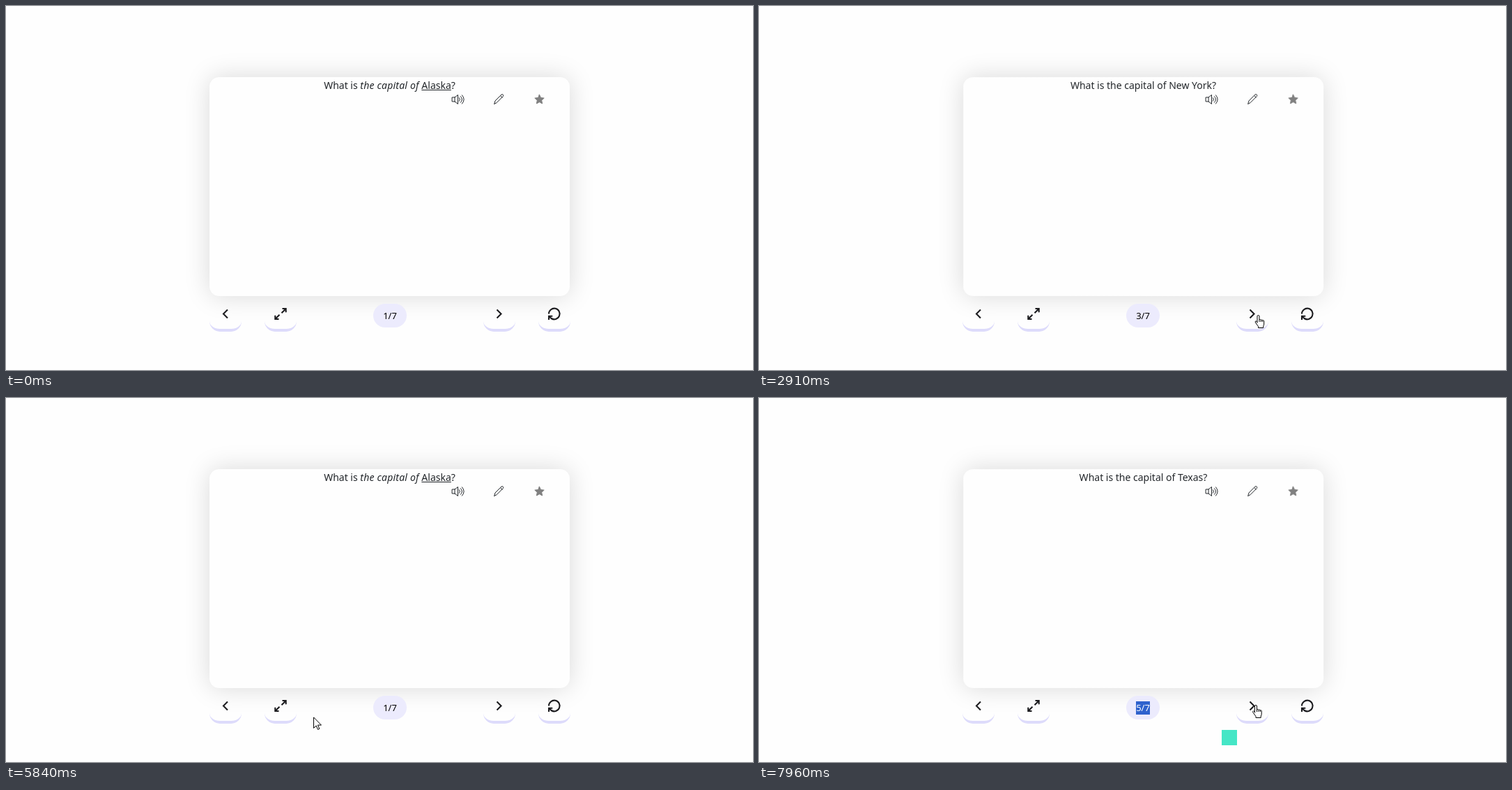
These frames come from a looping animation (1072x522 px, 8 s). An HTML page:

```html
<!DOCTYPE html>
<html lang="en">
<head>
<meta charset="utf-8">
<title>Flashcards</title>
<style>
html, body { margin: 0; width: 100%; height: 100%; overflow: hidden; background: #fefefe; }
body { position: relative; font-family: "Noto Sans", "Open Sans", sans-serif; color: #212529; }
#stage, #ui { position: absolute; left: 0; top: 0; width: 1072px; height: 522px; }
#card { position: absolute; left: 292px; top: 102px; width: 517px; height: 314px; border-radius: 14px;
  background: #fefefe; box-shadow: 0 0 36px rgba(0,0,0,.15); }
#question { font-size: 14px; line-height: 24px; text-align: center; white-space: nowrap; }
#question i { letter-spacing: .2px; }
#card svg { position: absolute; left: 0; top: 0; overflow: visible; }
.button { position: absolute; top: 421px; width: 46px; height: 46px; box-sizing: border-box;
  border-bottom: 4px solid #dddbfb; border-radius: 15px; }
#pill { position: absolute; left: 527px; top: 427px; width: 48px; height: 34px; border-radius: 17px;
  background: #ecebfd; font-size: 13px; font-weight: 500; line-height: 34px; text-align: center; color: #000; }
#count { display: inline-block; height: 19px; line-height: 19px; }
#count.selected { background: #2f62cd; color: #fff; }
#badge { position: absolute; width: 22px; height: 22px; background: #45e6c6; }
</style>
</head>
<body>
<div id="stage">
  <div id="card">
    <div id="question"></div>
    <svg width="517" height="60" fill="none" stroke="#212529" stroke-linecap="round" stroke-linejoin="round">
      <path d="M348.500 29h3.500l4.500-3.500v13l-4.500-3.500h-3.500zM352 29v6M358.500 29.700q2 2.300 0 4.600M360.500 27.700q4 4.300 0 8.600M362.500 25.800q5.500 6.200 0 12.400"/>
      <path d="M408.700 38.300l1.300-4.300 9-9q1.200-.8 2.200.2t.2 2.200l-9 9zM417.500 26.500l2.500 2.500"/>
      <path fill="#808080" stroke="#808080" d="M473.500 25.200l2 4.300 4.700.6-3.500 3.200.9 4.700-4.100-2.300-4.100 2.300.9-4.700-3.500-3.200 4.700-.6z"/>
    </svg>
  </div>
</div>
<div id="buttons"></div>
<div id="pill"><span id="count"></span></div>
<div id="badge"></div>
<svg id="ui" fill="none" stroke="#1c1c1f" stroke-width="2.100">
  <path d="M318 435.500l-6 6 6 6M704.500 435.500l6 6-6 6"/>
  <path d="M396.500 434h5.200v5.200M401.500 434.200l-6 6M391.500 449h-5.200v-5.200M386.500 448.800l6-6"/>
  <path d="M779 441.500A7.800 7.800 0 1 1 782.500 448L779.500 445.200M779 450v-5.200h5.300"/>
  <g id="cursor" fill="#fff" stroke="#000" stroke-width="1" stroke-linejoin="round">
    <path id="hand" d="M3.500 11.500V2a1.500 1.500 0 0 1 3 0v5a1.400 1.400 0 0 1 2.400.4a1.400 1.400 0 0 1 2.300.6a1.200 1.200 0 0 1 2 1v4q0 2-1 3v2.500h-7.200v-2l-4-5.500q-1-1.800.5-2.200q1 0 2 1.700M6.500 7v3M8.900 7.500v2.500M11.200 8v2"/>
    <path id="arrow" d="M.5.500v15.500l3.600-3.500 2.400 5.500 2.300-1-2.400-5.300h5z"/>
  </g>
</svg>
<script>
const LOOP = 8000, ENTER = 375, STEP = 1000 / 15;
const FAST_RUN = 6380, FAST_GAP = 405;
const $ = id => document.getElementById(id);

const questions = ["What is <i>the capital of</i> <u>Alaska</u>?",
  ...["California", "New York", "Florida", "Texas"].map(place => `What is the capital of ${place}?`)];

// When each card comes up; the last four follow at an even pace
const turns = [[-LOOP, 1], [1760, 2], [2570, 3], [4430, 2], [5220, 1],
  ...[2, 3, 4, 5].map((card, i) => [FAST_RUN + i * FAST_GAP, card])];
const selectAt = FAST_RUN + 2 * FAST_GAP;

// Pointer trips: departure, arrival, left, top
const pointerStart = [554, 370];
const trips = [[590, 1340, 711.5, 443], [2950, 3590, 369, 441], [3990, 4360, 314, 441], [5600, 6180, 708, 440]];

const buttonLefts = [292, 371, 685, 764];
$("buttons").innerHTML = buttonLefts.map(left => `<div class="button" style="left:${left}px"></div>`).join("");

function pointerAt(t) {
  let [x, y] = pointerStart;
  for (const [leave, arrive, toX, toY] of trips) {
    if (t < leave) break;
    const k = Math.min(1, (t - leave) / (arrive - leave)), s = k * k * (3 - 2 * k);
    const dip = .05 * Math.abs(toX - x) * Math.sin(Math.PI * s);
    x += (toX - x) * s;
    y += (toY - y) * s + dip;
  }
  return [x, y];
}

function drawCard(t, turn) {
  const [since, number] = turns[turn];
  const side = turn && number < turns[turn - 1][1] ? -1 : 1;
  const rest = (1 - Math.min(1, (t - since) / ENTER)) ** 2;
  if ($("count").textContent !== number + "/7") {
    $("question").innerHTML = questions[number - 1];
    $("count").textContent = number + "/7";
  }
  $("card").style.transform = rest ?
    `perspective(1000px) translateX(${80 * side * rest}px) rotateY(${-15 * side * rest}deg)` : "none";
  $("card").style.opacity = 1 - .7 * rest ** 1.5;
  // A card just entering is cut off at the right edge of its frame
  $("stage").style.clipPath = rest > .6 ? "inset(0 227px 0 0)" : "none";
}

function drawPointer(t) {
  const [x, y] = pointerAt(t);
  const over = y >= 420 && y < 467 && buttonLefts.some(left => x + 5 >= left && x + 5 < left + 46);
  $("cursor").style.display = t < trips[0][0] ? "none" : "";
  $("cursor").setAttribute("transform", `translate(${x} ${y})`);
  $("hand").style.display = over ? "" : "none";
  $("arrow").style.display = over ? "none" : "";
}

function draw(time) {
  // The picture advances at 15 steps a second, counted from the latest turn
  const turn = turns.findLastIndex(([at]) => at <= time);
  const since = Math.max(0, turns[turn][0]);
  const t = since + Math.floor((time - since) / STEP + .05) * STEP;
  const selected = t >= selectAt;
  drawCard(t, turn);
  drawPointer(t);
  $("count").className = selected ? "selected" : "";
  $("badge").style.display = t > FAST_RUN ? "block" : "none";
  $("badge").style.left = (selected ? 664 : 534) + "px";
  $("badge").style.top = (selected ? 476 : 461) + "px";
}

const begin = performance.now();
function tick() {
  draw((performance.now() - begin) % LOOP);
  requestAnimationFrame(tick);
}
tick();
</script>
</body>
</html>
```
